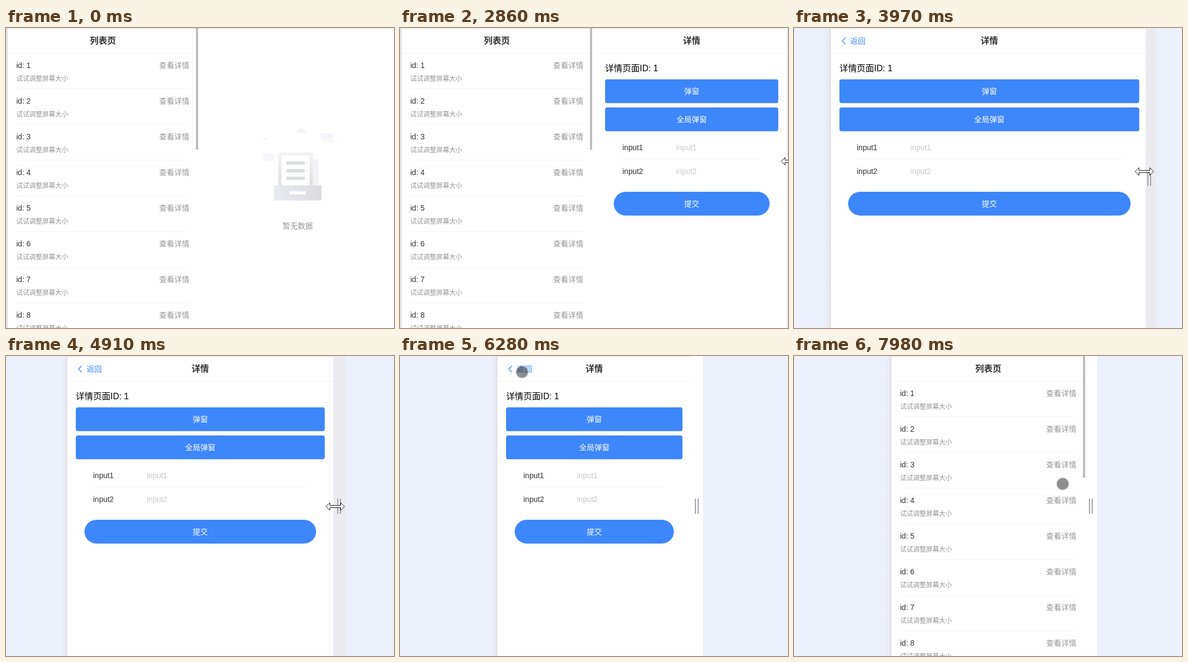
Recreate the animation shown at these times as an HTML page. Size 717x555 px, loop 8000 ms.

```html
<!DOCTYPE html>
<html lang="zh-CN">
<head>
<meta charset="utf-8">
<style>
html, body { margin: 0; width: 100%; height: 100%; overflow: hidden; background: #ecf0fa; }
svg { display: block; font: 14px "Liberation Sans", Arial, "Noto Sans CJK SC", "Noto Sans CJK", sans-serif; }
</style>
</head>
<body>
<svg id="stage" width="717" height="555" viewBox="0 0 717 555">
  <defs>
    <linearGradient id="shade"><stop stop-color="#ecf0fa"/><stop offset="1" stop-color="#e7e6ec"/></linearGradient>
    <linearGradient id="tray"><stop stop-color="#e9eaf2"/><stop offset="1" stop-color="#dcdcde"/></linearGradient>
    <linearGradient id="doc" x2="0" y2="1"><stop stop-color="#f4f4f6"/><stop offset="1" stop-color="#dfdfe3"/></linearGradient>
    <linearGradient id="cloud" x2="0" y2="1"><stop stop-color="#f2f3f7"/><stop offset="1" stop-color="#f9f9fb"/></linearGradient>
  </defs>
  <g id="scene"></g>
</svg>
<script>
const LOOP = 8000, STEP = 40, AXIS = 718;
const BLUE = '#3d87fb', DARK = '#323233', GREY = '#969799', PALE = '#c8c9cc', LINE = '#f3f3f5';
const scene = document.getElementById('scene');

// Movement advances in 40 ms steps counted from the start of each burst.
const bursts = [0, 3650, 4750, 5800, 6730, 7060, 7940];

// Each point is [time, value, ...].
const frameLeft = [[3610, 3], [3970, 68], [4130, 88], [4710, 88], [4910, 113], [5310, 159], [5510, 180]];
const gripLeft = [[3610, 3], [3970, 72], [4130, 88], [4710, 88], [4910, 113], [5310, 163], [5510, 180]];
const layoutLag = [[3610, 0], [3970, 4], [4130, 0]];
const dragPath = [[3610, 721.5, 246.5], [3970, 647.5, 265.5], [4130, 636, 271], [4710, 636, 271],
  [4910, 608.5, 278.5], [5310, 558.5, 297.5], [5510, 544.5, 301.5]];
const touchPath = [[5760, 544.5, 301.5], [6280, 225.5, 29.5], [7020, 225.5, 29.5],
  [7860, 532.5, 218.5], [7900, 532.5, 218.5], [7980, 496.5, 236.5]];

const smooth = u => u * u * (3 - 2 * u);

function track(points, t, ease = u => u) {
  const next = points.findIndex(p => p[0] > t);
  if (next === 0) return points[0].slice(1);
  if (next < 0) return points[points.length - 1].slice(1);
  const a = points[next - 1], b = points[next];
  const u = ease((t - a[0]) / (b[0] - a[0]));
  return a.slice(1).map((v, i) => v + (b[i + 1] - v) * u);
}

const rect = (x, y, w, h, fill, r = 0) =>
  `<rect x="${x}" y="${y}" width="${Math.max(0, w)}" height="${h}" rx="${r}" fill="${fill}"/>`;
const text = (x, y, str, fill = DARK, anchor = 'start', size = 14, weight = 400) =>
  `<text x="${x}" y="${y}" fill="${fill}" text-anchor="${anchor}" font-size="${size}" font-weight="${weight}">${str}</text>`;

const header = (l, r, title) =>
  rect(l, 46, r - l, 1, LINE) + text((l + r) / 2, 29, title, DARK, 'middle', 16, 700);

function list(l, r, thumb) {
  let out = header(l, r, '列表页');
  for (let i = 0; i < 8; i++) {
    const y = 66 * i;
    out += text(l + 16, y + 74, `id: ${i + 1}`) +
      text(r - 16, y + 74, '查看详情', GREY, 'end') +
      text(l + 16, y + 98, '试试调整屏幕大小', GREY, 'start', 12) +
      rect(l + 16, y + 112, r - l - 32, 1, LINE);
  }
  return out + (thumb ? rect(r - 4, 0, 4, 225, '#bdbdbd') : '');
}

function button(l, r, y, label, inset, radius) {
  return rect(l + inset, y, r - l - 2 * inset, 44, BLUE, radius) +
    text((l + r) / 2, y + 27, label, '#fff', 'middle');
}

function field(l, y, name) {
  return text(l + 48, y, name) + text(l + 147, y, name, PALE);
}

function detail(l, r, back) {
  const chevron = `<path d="M${l + 27} 18L${l + 21} 24L${l + 27} 30" fill="none" stroke="${BLUE}" stroke-width="1.3"/>`;
  return header(l, r, '详情') +
    (back ? chevron + text(l + 36, 29, '返回', BLUE) : '') +
    text(l + 16, 80, '详情页面ID: 1', '#000', 'start', 16) +
    button(l, r, 95, '弹窗', 16, 4) +
    button(l, r, 147, '全局弹窗', 16, 4) +
    field(l, 226, 'input1') +
    rect(l + 48, 242, r - l - 96, 1, LINE) +
    field(l, 270, 'input2') +
    button(l, r, 303, '提交', 32, 22);
}

function empty() {
  const bars = [247, 261, 275].map(y => rect(518, y, 34, 6, '#dcdde0')).join('');
  return '<path d="M537 194a8.5 8 0 0 1 17 0zM474 207a4 3.5 0 0 1 8 0z" fill="#f3f3f6"/>' +
    rect(582, 195, 22, 15, 'url(#cloud)') + rect(586, 209, 28, 3, '#f9f9fb') +
    rect(475, 233, 20, 14, 'url(#cloud)') +
    rect(567, 243, 10, 48, '#f3f3f5', 1) +
    rect(503, 230, 64, 62, 'url(#doc)', 3) + rect(509, 236, 52, 55, '#fefefe') + bars +
    rect(495, 291, 88, 28, 'url(#tray)', 1) + rect(524, 302, 30, 6, '#fefefe', 1) +
    text(539, 371, '暂无数据', GREY, 'middle');
}

function cursor(t) {
  if (t < 2860) return '';
  if (t < 5800) {
    const [x, y] = track(dragPath, t);
    return `<path transform="translate(${x} ${y})" d="M-17 0L-10-7V-2H10V-7L17 0L10 7V2H-10V7Z" fill="#fff" stroke="#111"/>`;
  }
  const [x, y] = track(touchPath, t, smooth);
  return `<circle cx="${x}" cy="${y}" r="10.5" fill="#000" fill-opacity=".44" stroke="#888" stroke-opacity=".55" stroke-width="2"/>`;
}

function draw(t) {
  const left = Math.round(track(frameLeft, t)[0]);
  const right = AXIS - left;
  const grip = AXIS - Math.round(track(gripLeft, t)[0]);
  const edge = right + Math.round(track(layoutLag, t)[0]);
  const hover = t >= 2860 && t < 5840;
  let page;
  if (edge - left > 640) {
    const pane = (edge - left - 8) / 2;
    page = list(left, left + pane, true) + (t < 1250 ? empty() : detail(edge - pane, edge, false));
  } else {
    page = t < 6730 ? detail(left, edge, true) : list(left, edge, t >= 6770);
  }
  scene.innerHTML =
    rect(0, 0, 717, 555, '#ecf0fa') +
    rect(left - 11, 0, 11, 555, 'url(#shade)') +
    rect(left, 0, right - left, 555, '#fefefe') +
    rect(left - 1, 0, 1, 555, '#d6d6da') +
    rect(left - 1, 0, right - left + 1, 1, '#d9d9dc') +
    page +
    rect(right, 0, AXIS - right, 555, '#ecf0fa') +
    rect(right, 0, grip + 22 - right, 555, hover ? '#eaeaef' : '#fefefe') +
    rect(grip + 7, 264, 2, 28, '#a3a3a3') + rect(grip + 12, 264, 2, 28, '#a3a3a3') +
    cursor(t);
}

let last = -1;
function tick(now) {
  const t = now % LOOP;
  const start = bursts.filter(b => b <= t).pop();
  const held = start + Math.floor((t - start) / STEP) * STEP;
  // The opening stretch has two cuts that fall between steps.
  const time = start ? held : t < 1250 ? 0 : t < 2860 ? 1250 : 2860;
  if (time !== last) draw(last = time);
  requestAnimationFrame(tick);
}
draw(0);
requestAnimationFrame(tick);
</script>
</body>
</html>
```
